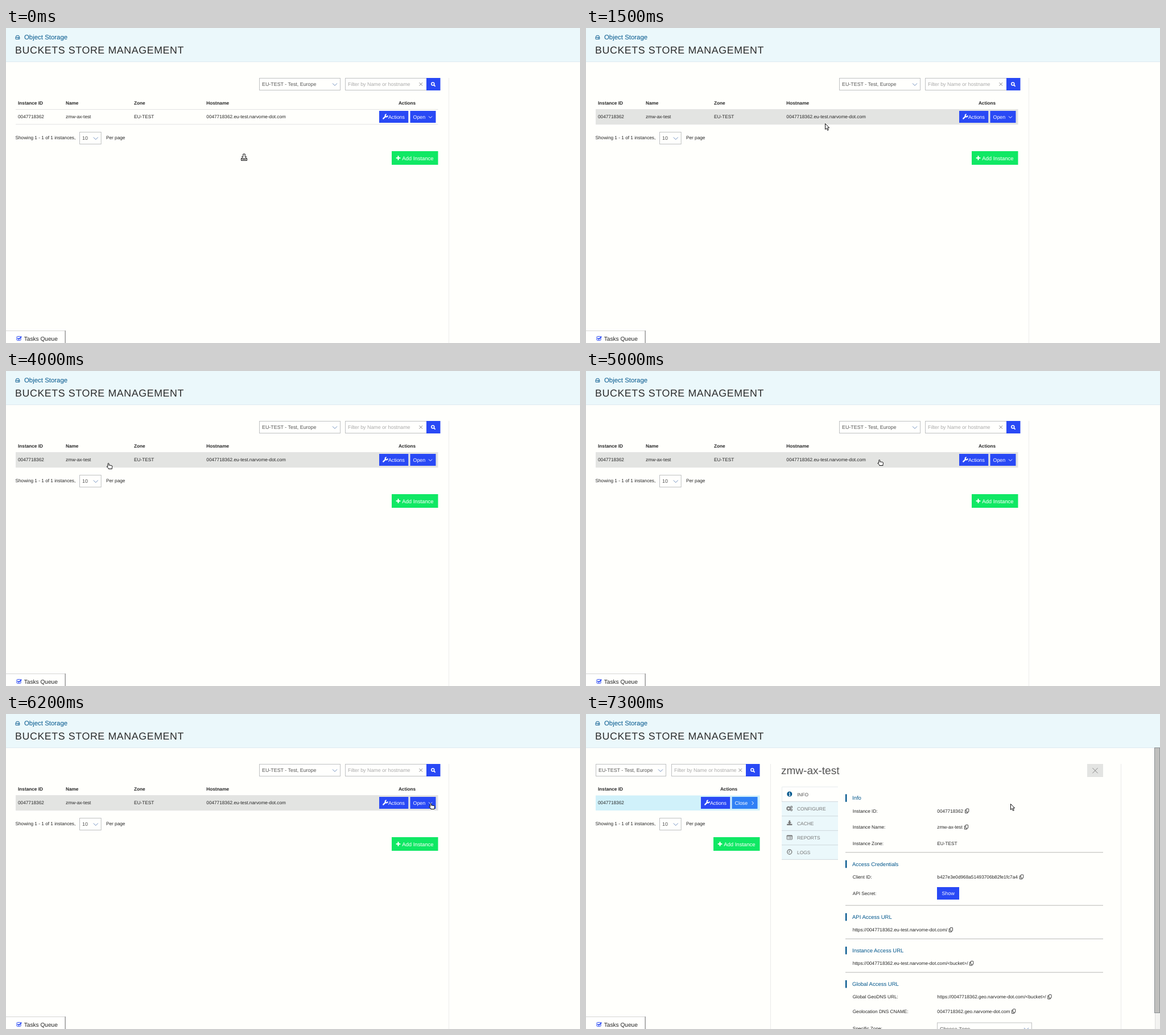
Write an HTML page that moves like this. It is 1009 px wide and 555 px high and loops after 8000 ms.

```html
<!DOCTYPE html>
<html lang="en">
<head>
<meta charset="utf-8">
<title>Buckets store management</title>
<style>
html, body { margin: 0; width: 100%; height: 100%; overflow: hidden; background: #fffffc; }
svg { display: block; width: 100%; height: 100%; }
text { font-family: "Liberation Sans", Arial, sans-serif; text-rendering: geometricPrecision; white-space: pre; }
</style>
</head>
<body>
<svg id="stage" viewBox="0 0 1009 555"></svg>
<script>
const SCALE = 0.6345; // page zoom applied to CSS font sizes
const INK = '#262626', NAVY = '#00568c', BLUE = '#2949f5', GREY = '#777', PALE = '#ebf8fb';
const ID = '0047718362', NAME = 'zmw-ax-test', DOMAIN = 'narvome-dot.com';
const HOST = `${ID}.eu-test.${DOMAIN}`;

// cy is the middle of the capital letters
const text = (x, cy, str, px = 13, fill = INK, extra = '') => {
  const size = px * SCALE;
  const safe = str.replace(/</g, '&lt;');
  return `<text x="${x}" y="${cy + size * 0.358}" font-size="${size}" fill="${fill}" ${extra}>${safe}</text>`;
};
const rect = (x, y, w, h, fill, stroke = 'none', extra = '') =>
  `<rect x="${x}" y="${y}" width="${w}" height="${h}" fill="${fill}" stroke="${stroke}" ${extra}/>`;
const line = (d, stroke, width = 1, extra = '') =>
  `<path d="${d}" fill="none" stroke="${stroke}" stroke-width="${width}" ${extra}/>`;
const circle = (x, y, r, fill, stroke = 'none', width = 1, extra = '') =>
  `<circle cx="${x}" cy="${y}" r="${r}" fill="${fill}" stroke="${stroke}" stroke-width="${width}" ${extra}/>`;
const group = (id, body) => `<g id="${id}">${body}</g>`;
const bold = 'font-weight="bold"', middle = 'text-anchor="middle"';

const chevron = (x, y, color = '#6f8fc0', r = 4) => line(`M${x - r} ${y - r / 2}l${r} ${r} ${r} ${-r}`, color);
const cross = (x, y, r, color) => line(`M${x - r} ${y - r}l${2 * r} ${2 * r}m0 ${-2 * r}l${-2 * r} ${2 * r}`, color);
const select = (x, y, w, label) =>
  rect(x + .5, y + .5, w - 1, 21, '#fffffd', '#bfc1c2') +
  text(x + 5, y + 11, label, 14, '#555') + chevron(x + w - 10, y + 11.5);
const wrench = (x, y) =>
  line(`M${x} ${y + 7}l4.2-4.2`, '#fff', 2.2, 'stroke-linecap="round"') +
  line(`M${x + 5.5} ${y - .5}a2.2 2.2 0 1 0 2.2 2.2`, '#fff', 1.8);
const copyIcon = (x, y) =>
  rect(x + 2.4, y - 3.8, 4.4, 5.8, '#fffffc', '#333', 'rx=".6" stroke-width=".9"') +
  line(`M${x + 2} ${y - 1.8}h-1.5v5.6h4.4v-1.5`, '#333', .9);

function panel(p) {
  const { selectX, selectW, inputX, inputW, right } = p;
  const go = inputX + inputW;
  return select(selectX, 88, selectW, 'EU-TEST - Test, Europe') +
    rect(inputX + .5, 88.5, inputW, 21, '#fffffd', '#bfc1c2') +
    text(inputX + 5, 99, 'Filter by Name or hostname', 14, '#aaa') +
    cross(go - 9.7, 99, 2.8, '#888') +
    rect(go, 88, 24.5, 22, BLUE) +
    circle(go + 11.3, 98.4, 2.5, 'none', '#fff', 1.5) +
    line(`M${go + 13} ${100.2}l2.6 2.6`, '#fff', 1.7) +
    text(21, 132, 'Instance ID', 13, INK, bold) +
    text(right - 54.5, 132, 'Actions', 13, INK, bold + middle) +
    text(21, 156.5, ID) +
    rect(right - 103.5, 146, 51.3, 21, BLUE) + wrench(right - 96.3, 152.6) +
    text(right - 87.6, 156.5, 'Actions', 14, '#fff') +
    rect(right - 49, 146, 45, 21, p.buttonColor) +
    text(right - 44, 156.5, p.button, 14, '#fff') +
    text(16.5, 193, 'Showing 1 - 1 of 1 instances,') + select(129, 183, 38.7, '10') +
    text(176, 193, 'Per page') +
    rect(right - 81.5, 217, 81.5, 24, '#10e864') +
    line(`M${right - 73.8} 229h7.6m-3.8-3.8v7.6`, '#fff', 2.2) +
    text(right - 63.3, 229.3, 'Add Instance', 15, '#fff');
}

const header = rect(0, 0, 1009, 59, PALE) + line('M0 59.5H1009', '#dfeaf0') +
  line('M17 16.5l1.4-3.2h4l1.4 3.2v3h-6.8zh6.8M20.7 18h2', NAVY, .9) +
  text(32, 16, 'Object Storage', 18, NAVY) +
  text(16, 38.6, 'BUCKETS STORE MANAGEMENT', 28, '#2b2b2b', 'letter-spacing=".6345"');

const tasks = rect(-1, 533.5, 105, 25, '#fffffd', '#d5d5d5') + line('M104.2 533V555', '#999', 1.4) +
  rect(19, 543.4, 7, 7, 'none', BLUE, 'rx="1.3" stroke-width="1"') +
  line('M20.5 546.4l2 2 4.8-4.8', BLUE, 1.7) +
  text(31.7, 547, 'Tasks Queue', 16);

const listView = rect(17, 143.5, 742.5, 26.5, '#e3e4e2', 'none', 'id="hover"') +
  line('M17 143.5H759.5M17 169.7H759.5', '#e3e3e3') +
  panel({ selectX: 445, selectW: 143, inputX: 596, inputW: 143, right: 759.5, button: 'Open', buttonColor: BLUE }) +
  chevron(746, 157, '#fff', 3) +
  [[105, 'Name', NAME], [225, 'Zone', 'EU-TEST'], [352.3, 'Hostname', HOST]].map(([x, head, cell]) =>
    text(x, 132, head, 13, INK, bold) + text(x, 156.5, cell)).join('') +
  line('M778.5 88V555', '#ececec');

const openView = rect(17, 143.5, 288.5, 26.5, '#d0f1fa') +
  panel({ selectX: 17, selectW: 124, inputX: 150, inputW: 131, right: 305.5, button: 'Close', buttonColor: '#2f80f5' }) +
  line('M291.5 154l3 3-3 3', '#fff') +
  line('M324.5 88V555M940.5 88V555', '#e9e9e9');

const menuIcons = [
  circle(0, 0, 4.5, NAVY) + line('M-1.2-.8H.4V2.6M-1.3 2.6H1.5M-.5-2.7H.7', '#fff', 1.2),
  circle(-1.7, 0, 2.6, 'none', GREY, 1.7) + circle(-1.7, 0, 3.7, 'none', GREY, 1, 'stroke-dasharray="1.5 1.4"') +
    circle(3.3, -2.6, 1.5, 'none', GREY, 1.2) + circle(3.3, 2.6, 1.5, 'none', GREY, 1.2),
  line('M0-4.5V-.8', GREY, 2.6) + '<path d="M-3.4-1.2H3.4L0 2.2Z" fill="#777"/>' + line('M-4.6 2.8H4.6', GREY, 2.4),
  rect(-4.7, -3.6, 9.4, 7.2, 'none', GREY, 'rx=".6"') +
    line('M-4.7-2.7H4.7', GREY, 1.6) + line('M-3.2-.4h1.2m1 0h4.4M-3.2 1.6h1.2m1 0h4.4', GREY, .9),
  circle(0, 0, 4, 'none', GREY, 1.3) + line('M0-2.4V.5H-2', GREY)
];
const menu = rect(344.5, 88.5, 99, 26, '#fffffd') + line('M443 88.5H344.5V114', '#e6ecee') +
  rect(344, 114.3, 99, 102, PALE) +
  ['INFO', 'CONFIGURE', 'CACHE', 'REPORTS', 'LOGS'].map((label, i) => {
    const y = 101.5 + i * 25.5;
    return `<g transform="translate(357.8 ${y - .5})">${menuIcons[i]}</g>` +
      text(371, y, label, 13.3, i ? GREY : '#555') +
      line(`M344 ${114.3 + i * 25.5}H443`, '#cfd8dc');
  }).join('');

const loading = text(682.3, 109.7, 'Loading Instance Information', 13, GREY, middle) +
  circle(682.5, 141, 14, 'none', '#eeeeec', 3.2) +
  group('outer', line('M672.6 131.1A14 14 0 0 1 692.4 131.1', '#555', 3.2)) +
  group('inner', line('M682.5 135A6 6 0 1 1 676.5 141', '#b5b5b5', 1.2)) +
  rect(-1, 545.5, 224.5, 12, '#f1f1ec', '#d0d0cc') +
  text(-1.2, 552, 'om...', 16, '#666');

const section = (y, title) => rect(456, y - 6.5, 2.4, 13.5, NAVY) + text(468, y, title, 15, NAVY);
const field = (y, label, value, copyX) =>
  text(468.7, y, label) + text(617.3, y, value) + (copyX ? copyIcon(copyX, y) : '');
const url = (y, value, copyX) => text(468.7, y, value) + copyIcon(copyX, y);

const info = text(343, 99.5, NAME, 30, '#555') +
  rect(881, 88, 28, 23, '#e3e4e2') + cross(895, 99.7, 4.6, '#888') +
  section(147.8, 'Info') +
  field(170.7, 'Instance ID:', ID, 666) +
  field(199.2, 'Instance Name:', NAME, 664.8) +
  field(227.8, 'Instance Zone:', 'EU-TEST') +
  section(264.2, 'Access Credentials') +
  field(287, 'Client ID:', 'b427e3e0d968a51493706b82fe1fc7a4', 762) +
  field(315.6, 'API Secret:', '') +
  rect(617, 305, 39, 22, BLUE) + text(636.7, 316, 'Show', 14, '#fff', middle) +
  section(357.4, 'API Access URL') + url(380.2, `https://${HOST}/`, 637.7) +
  section(416.4, 'Instance Access URL') + url(439.2, `https://${HOST}/<bucket>/`, 674) +
  section(475.6, 'Global Access URL') +
  field(498.3, 'Global GeoDNS URL:', `https://${ID}.geo.${DOMAIN}/<bucket>/`, 811.3) +
  field(523.7, 'Geolocation DNS CNAME:', `${ID}.geo.${DOMAIN}`, 748) +
  field(554, 'Specific Zone:', '') + select(617, 543.5, 167, 'Choose Zone') +
  line('M456 243.8H909M456 337.2H909M456 396.2H909M456 455.2H909', '#cfcfcd', 1.4) +
  rect(1000, 59, 9, 496, '#f3f3f1') + line('M1000.5 527V555', '#ddd') +
  rect(999.5, 59.5, 9, 467, '#bfbfbd', '#8a8f92');

const shape = d => `<path d="${d}" fill="#fff" stroke="#111" stroke-linejoin="round"/>`;
const cursors = {
  drop: shape('M3.8.5h3.4v4.8h2.4L5.5 9.4 1.4 5.3h2.4z') + shape('M.5 8v4h10V8l-1.7 0v1.8H2.2V8z'),
  arrow: shape('M.5.5V10.7L2.9 8.6 4.6 12.4 6.3 11.6 4.6 7.8H7.7Z'),
  hand: shape('M2.7 6.3V1.6q0-1.1 1-1.1t1 1.1V4q3 0 5.2.9.7.3.6 1.2L10 8.6V10.5H3.8V9.3L.6 6.6q.5-1.3 2.1-.3z')
};

const stage = document.getElementById('stage');
stage.innerHTML = header + group('list', listView) + group('open', openView) + group('menu', menu) +
  tasks + group('loading', loading) + group('info', info) +
  group('cursor', Object.keys(cursors).map(k => group(k, cursors[k])).join(''));

const el = id => document.getElementById(id);
const show = (id, on) => el(id).setAttribute('display', on ? 'inline' : 'none');
const move = (id, value) => el(id).setAttribute('transform', value);

// start time, number of 100 ms steps, destination
const moves = [
  [0, 1, 413, 221.5], [500, 1, 416, 231], [1100, 5, 420, 168], [1700, 1, 416, 159], [2000, 1, 295, 157],
  [2200, 2, 216, 157], [2500, 4, 494.5, 145.5], [3200, 2, 280, 160], [3500, 4, 205, 163],
  [4000, 3, 119, 160], [4300, 6, 454, 156], [4900, 2, 512, 156], [5100, 2, 563, 156],
  [5500, 5, 761, 157], [6000, 1, 765, 156], [6100, 2, 743, 157], [6800, 1, 746, 158]
];

function cursorAt(t) {
  let x = 413, y = 221.5;
  for (const [start, steps, toX, toY] of moves) {
    if (t < start) break;
    const k = Math.min(1, (Math.floor((t - start) / 100) + 1) / steps);
    x += (toX - x) * k;
    y += (toY - y) * k;
  }
  return { x, y };
}

function draw() {
  const t = performance.now() % 8000;
  const { x, y } = cursorAt(t);
  const opened = t >= 6800, loaded = t >= 7300;
  const hovered = !opened && x < 759 && y < 170;
  const kind = t < 500 ? 'drop' : hovered && t >= 1700 ? 'hand' : 'arrow';
  show('list', !opened);
  show('hover', hovered);
  show('open', opened);
  show('menu', opened);
  show('loading', opened && !loaded);
  show('info', loaded);
  for (const k in cursors) show(k, k === kind);
  move('menu', `translate(0 ${loaded ? 40 : 0})`);
  move('cursor', `translate(${x} ${y})`);
  const turn = Math.floor((t - 6900) / 100) * 36;
  move('outer', `rotate(${turn + 8} 682.5 141)`);
  move('inner', `rotate(${turn} 682.5 141)`);
  requestAnimationFrame(draw);
}
draw();
</script>
</body>
</html>
```
